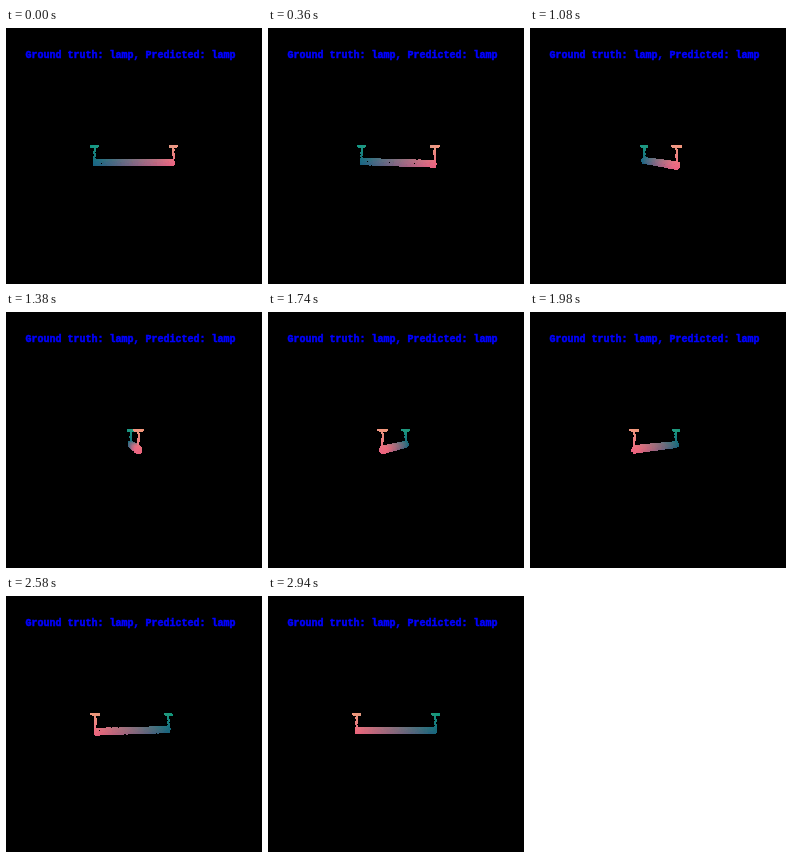
An HTML page with a canvas that plays this animation: 256 px wide and 256 px high, repeating every 3 s.

```html
<!DOCTYPE html>
<html>
<head>
<meta charset="utf-8">
<style>
html, body { margin: 0; width: 100%; height: 100%; overflow: hidden; background: #000; }
canvas { display: block; }
</style>
</head>
<body>
<canvas id="stage" width="256" height="256"></canvas>
<script>
const ctx = document.getElementById('stage').getContext('2d');
const STEP = 60, STEPS = 50, CAMERA = 229, HORIZON = 118.5;

let seed = 7;
const rand = () => (seed = seed * 16807 % 2147483647) / 2147483647;
const between = (a, b) => a + (b - a) * rand();

// Point cloud: y runs downward from eye level, colour follows position
const points = [];
function add(x, y, z) {
  const r = 130 + x * 2.7, g = 151 - y * 2.8, b = 128 + z * 1.5;
  points.push({ x, y, z, color: `rgb(${r | 0},${g | 0},${b | 0})` });
}
function addRound(count, radius, place) {
  for (let i = 0; i < count; i++) {
    const a = between(0, 2 * Math.PI), r = radius();
    place(r * Math.cos(a), r * Math.sin(a));
  }
}

// Bar with closed ends, each end hanging from a stem with a flat cap
addRound(850, () => 2.75, (u, v) => add(between(-39.3, 39.3), 16.1 + u, v));
for (const x of [-39.3, 39.3]) {
  addRound(40, () => 2.75 * Math.sqrt(rand()), (u, v) => add(x, 16.1 + u, v));
  addRound(16, () => 0.5, (u, v) => add(x + u, between(0.5, 13), v));
  addRound(90, () => 3.8 * Math.sqrt(rand()), (u, v) => add(x + u, between(-0.5, 0.1), v));
}

function draw(step) {
  const angle = Math.PI * step / (STEPS - 1);
  const c = Math.cos(angle), s = Math.sin(angle);
  ctx.fillStyle = '#000';
  ctx.fillRect(0, 0, 256, 256);

  for (const p of points) p.depth = p.x * s + p.z * c;
  points.sort((a, b) => a.depth - b.depth);
  for (const p of points) {
    const k = CAMERA / (CAMERA - p.depth);
    const x = 128 + (p.x * c - p.z * s) * k;
    const y = HORIZON + p.y * k;
    ctx.fillStyle = p.color;
    ctx.fillRect(Math.round(x - 1), Math.round(y - 1), 2, 2);
  }

  const label = 'Ground truth: lamp, Predicted: lamp';
  ctx.font = 'bold 10px "Liberation Mono", monospace';
  ctx.fillStyle = ctx.strokeStyle = '#00f';
  ctx.lineWidth = 0.5;
  ctx.fillText(label, 19.5, 30);
  ctx.strokeText(label, 19.5, 30);
}

const start = performance.now();
let shown = -1;
function tick() {
  const step = Math.floor((performance.now() - start) / STEP) % STEPS;
  if (step !== shown) draw(shown = step);
  requestAnimationFrame(tick);
}
tick();
</script>
</body>
</html>
```
